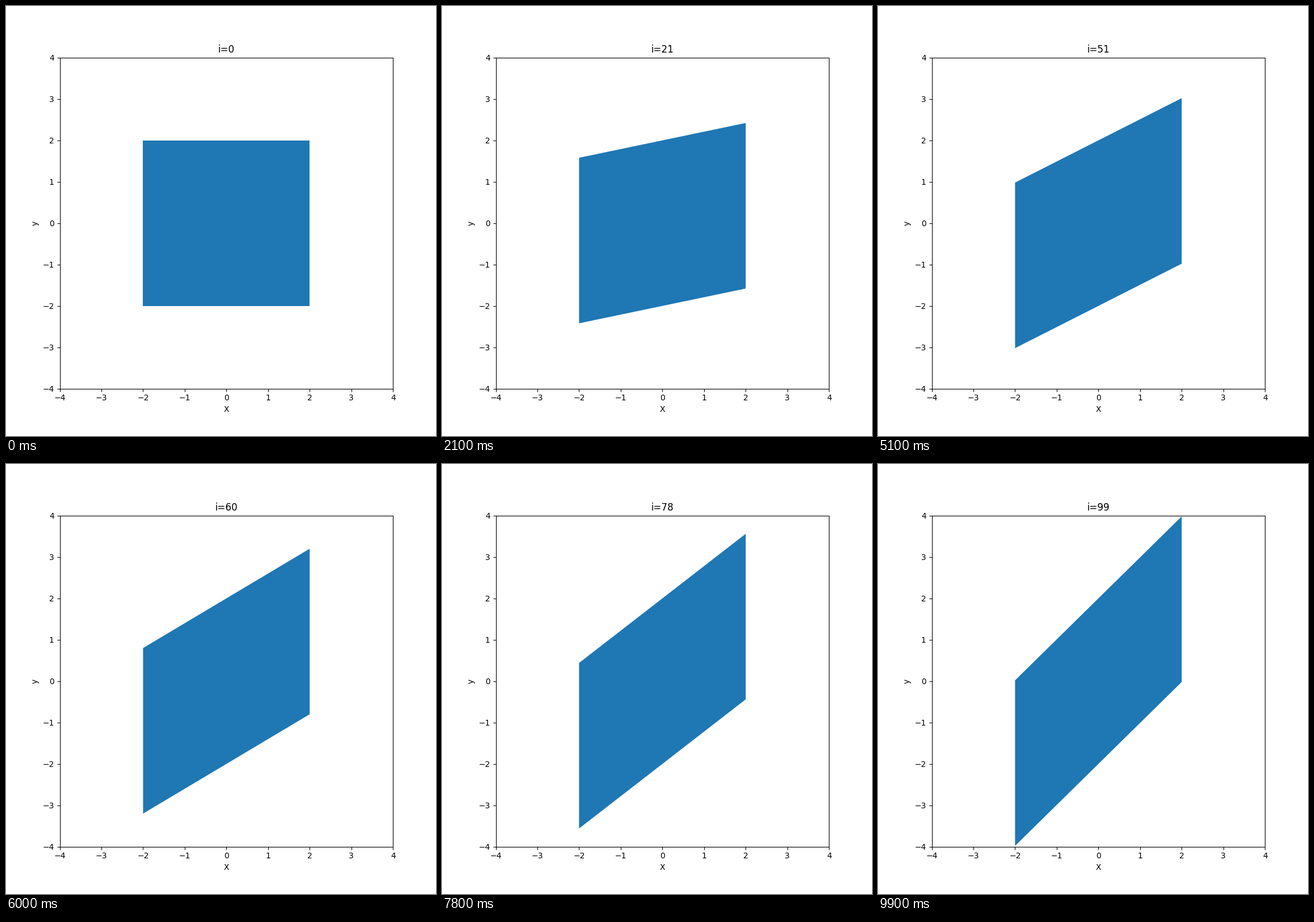
Animation, 748 px wide and 748 px high, one loop 10 s. Source, as a matplotlib script:

```python
import matplotlib.pyplot as plt
import numpy as np
from matplotlib.animation import FuncAnimation

FRAMES = 100
SQUARE = np.array([[-2, -2], [2, -2], [2, 2], [-2, 2]], dtype=float)

fig, ax = plt.subplots(figsize=(7.48, 7.48), dpi=100)
ax.set(xlim=(-4, 4), ylim=(-4, 4), xlabel="X", ylabel="y")
title = ax.set_title("i=0")
shape = ax.fill(*SQUARE.T, color="tab:blue", linewidth=0)[0]


def update(i):
    """Shear the square vertically by i percent."""
    shear = np.array([[1, 0], [i / FRAMES, 1]])
    shape.set_xy(SQUARE @ shear.T)
    title.set_text(f"i={i}")
    return shape, title


anim = FuncAnimation(fig, update, frames=FRAMES, interval=100,
                     repeat=True, repeat_delay=0)
plt.show()
```
